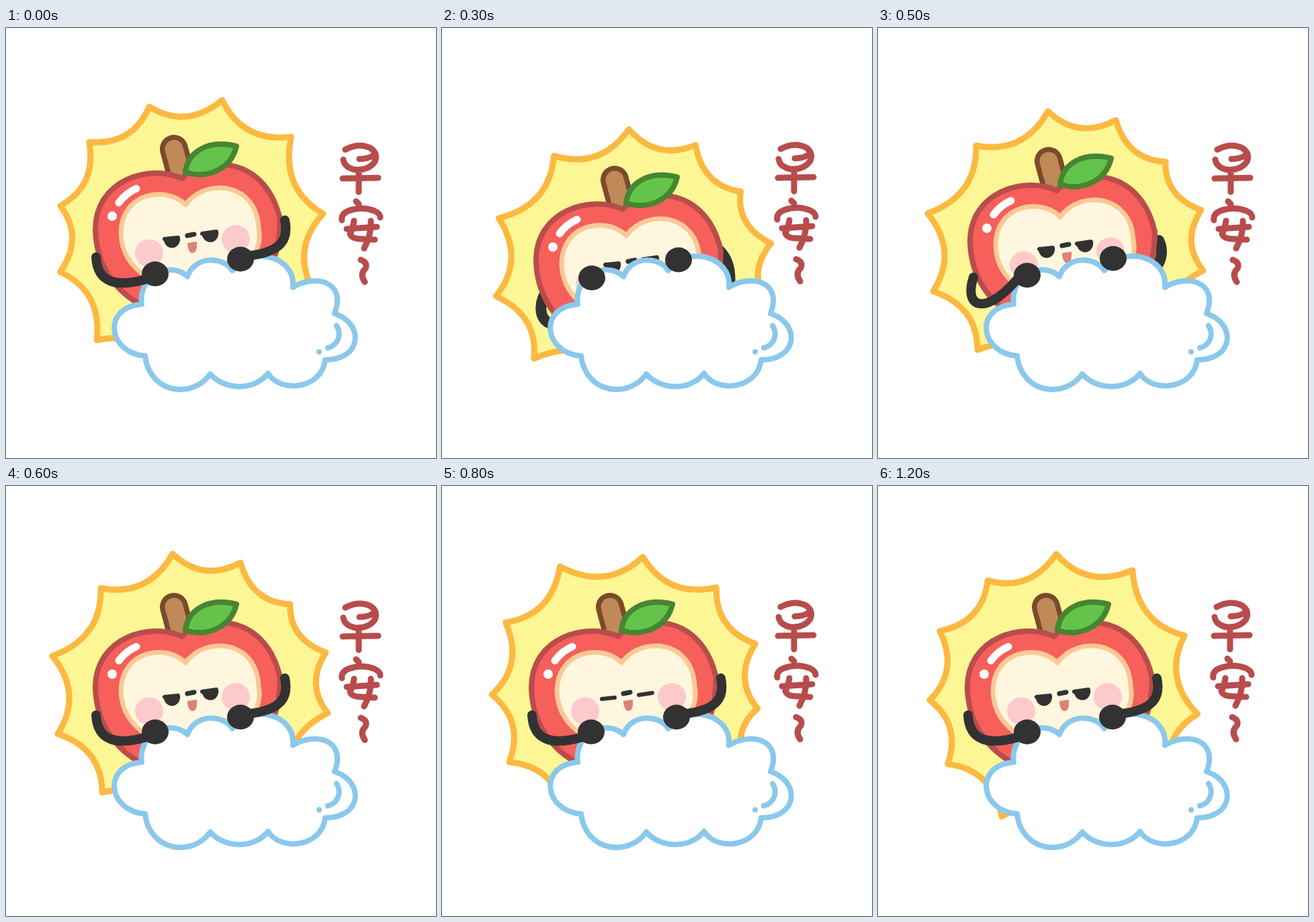
Recreate the animation shown at these times as an HTML page. Size 640 by 640 pixels, loop 1.4 s.

```html
<!DOCTYPE html>
<html lang="zh">
<head>
<meta charset="utf-8">
<title>早安</title>
<style>
html, body { margin: 0; width: 100%; height: 100%; overflow: hidden; background: #fff; }
svg { display: block; width: 100%; height: 100%; }
path, ellipse, circle { stroke-linecap: round; stroke-linejoin: round; }
.line { fill: none; }
.arm { fill: none; stroke: #323232; stroke-width: 14; }
.eye { fill: #323232; stroke: #323232; stroke-width: 6; }
</style>
</head>
<body>
<svg viewBox="0 0 640 640">
  <path id="sun" fill="#fdf694" stroke="#fcb941" stroke-width="9"/>
  <path id="back" class="arm" style="stroke-width:16"/>

  <g id="apple">
    <path class="line" d="M250 180L261 221" stroke="#7a4a2b" stroke-width="42"/>
    <path class="line" d="M250 180L261 221" stroke="#bf8a58" stroke-width="27"/>
    <path fill="#f65f5a" stroke="#b94c4c" stroke-width="8"
      d="M262 224C285 195 384 181 408 285C408 330 395 365 370 390L300 430Q230 440 197 410C155 385 134 345 133 300C133 225 215 202 262 224Z"/>
    <path fill="#fef6de" stroke="#fbc995" stroke-width="7"
      d="M267 263C240 235 172 243 171 305C172 335 185 355 215 375L330 375Q385 340 376 298C374 232 300 220 267 263Z"/>
    <path fill="#64c34a" stroke="#468532" stroke-width="8"
      d="M267 215C270 185 300 165 343 176C335 210 300 225 267 215Z"/>
    <path class="line" d="M168 260Q178 246 194 239" stroke="#fff" stroke-width="11"/>
    <circle cx="158" cy="280" r="7" fill="#fff"/>
    <g fill="#fccaca">
      <ellipse cx="213" cy="335" rx="21" ry="20.5"/>
      <ellipse cx="342" cy="314" rx="21" ry="20.5"/>
    </g>
    <g id="face">
      <path class="line" d="M270 309L280 307" stroke="#323232" stroke-width="7"/>
      <path d="M271 321L283 319Q284 334 277 334Q272 333 271 321Z" fill="#e08078" stroke="#d98278" stroke-width="2"/>
      <g id="open" class="eye">
        <path d="M236 314L256 312A9 10 0 0 1 238 316Z"/>
        <path d="M292 306L313 303A9 10 0 0 1 295 308Z"/>
      </g>
      <path id="shut" class="eye" d="M238 317L257 315M293 311L313 308"/>
    </g>
  </g>

  <path fill="#fff" stroke="#8ac8ec" stroke-width="8"
    d="M202 411C196 368 246 346 270 370C280 340 322 338 337 361C365 322 432 340 427 386C458 366 508 376 489 425C534 440 530 494 475 494C470 538 408 544 390 514C370 540 326 540 304 515C278 552 214 545 207 488C152 484 142 416 202 411Z"/>
  <path class="line" d="M492 443C500 455 495 472 479 476M466 482h.1" stroke="#8ac8ec" stroke-width="8"/>

  <path id="front" class="arm"/>
  <g fill="#323232">
    <ellipse id="left" rx="20" ry="18.5"/>
    <ellipse id="right" rx="20" ry="18.5"/>
  </g>

  <path id="words" class="line" stroke="#b84c4c" stroke-width="9"
    d="M505 181Q526 170 543 179Q554 187 549 199Q540 212 520 211Q504 208 502 196M526 195Q538 195 546 190
       M501 224L554 223M525 212L525 244
       M521 258L525 262M500 286Q498 277 510 272Q530 265 548 272Q557 276 557 282
       M518 287Q516 300 512 306Q514 314 530 314L549 315M543 287Q544 308 533 328M507 299L552 296
       M528 345Q539 349 535 358Q526 366 534 378"/>
</svg>
<script>
const $ = id => document.getElementById(id);
const set = (id, attrs) => {
  for (const k in attrs) $(id).setAttribute(k, attrs[k]);
};

// Sun tips around the pivot, joined by inward-curving edges.
const PIVOT = [272, 306];
const FLOOR = 492;
const tips = [[143, 456], [77, 369], [69, 253], [141, 152], [248, 101], [349, 114],
  [423, 176], [476, 248], [479, 338], [422, 438], [338, 490], [235, 504]];

function sunPath(x, y, angle) {
  const c = Math.cos(angle * Math.PI / 180), s = Math.sin(angle * Math.PI / 180);
  const [cx, cy] = [PIVOT[0] + x, PIVOT[1] + y];
  // The lowest tips flatten out behind the cloud.
  const points = tips.map(([px, py]) => {
    const dx = px - PIVOT[0], dy = py - PIVOT[1];
    return [cx + dx * c - dy * s, Math.min(FLOOR, cy + dx * s + dy * c)];
  });
  return 'M' + points[0] + points.map((a, i) => {
    const b = points[(i + 1) % points.length];
    const mx = (a[0] + b[0]) / 2, my = (a[1] + b[1]) / 2;
    const pull = 0.36 * Math.hypot(b[0] - a[0], b[1] - a[1]) / Math.hypot(cx - mx, cy - my);
    return `Q${mx + (cx - mx) * pull} ${my + (cy - my) * pull} ${b}`;
  }).join('') + 'Z';
}

const poses = {
  up: {
    back: '',
    front: 'M134 341C136 380 165 386 208 374M415 286C421 315 410 333 362 339',
    hands: [222, 366, 349, 344]
  },
  mid: {
    back: 'M418 316Q426 332 418 350',
    front: 'M142 371C126 421 165 427 212 368',
    hands: [222, 368, 350, 343]
  },
  low: {
    back: 'M160 385C140 410 146 436 162 440M412 330C428 345 430 365 428 385',
    front: '',
    hands: [223, 372, 352, 345]
  }
};

// time, apple x, apple y, sun angle, pose, lettering shift
const keys = [
  [0, 0, 0, 122, 'up', 0],
  [200, 8, 62, 11.5, 'low', 0],
  [300, 7, 46, 6, 'low', 1],
  [400, 6, 30, -0.5, 'mid', 1],
  [470, 4, 18, 0, 'mid', 0],
  [540, 2, 7, 0, 'up', 0],
  [600, 0, 0, 0, 'up', 0],
  [670, 0, 0, 16, 'up', 1],
  [700, 0, 0, 32, 'up', 1],
  [800, 0, 0, 48, 'up', 1],
  [900, 0, 0, 70, 'up', 0],
  [1000, 0, 0, 91, 'up', 0],
  [1200, 0, 0, 106, 'up', 1]
];

function draw(now) {
  const t = now % 1400;
  const [start, x, y, angle, name, shift] = keys.filter(k => k[0] <= t).pop();
  const { back, front, hands } = poses[name];
  const blink = start === 800;
  set('sun', { d: sunPath(x * 1.25, y && y + 5, angle) });
  set('apple', { transform: `translate(${x} ${y})` });
  set('face', { transform: `translate(0 ${-y / 6})` });
  set('back', { d: back });
  set('front', { d: front });
  set('left', { cx: hands[0], cy: hands[1] });
  set('right', { cx: hands[2], cy: hands[3] });
  set('words', { transform: `translate(${-shift} ${-shift})` });
  set('open', { visibility: blink ? 'hidden' : 'visible' });
  set('shut', { visibility: blink ? 'visible' : 'hidden' });
}

const begin = performance.now();
function tick() {
  draw(performance.now() - begin);
  requestAnimationFrame(tick);
}
tick();
</script>
</body>
</html>
```
